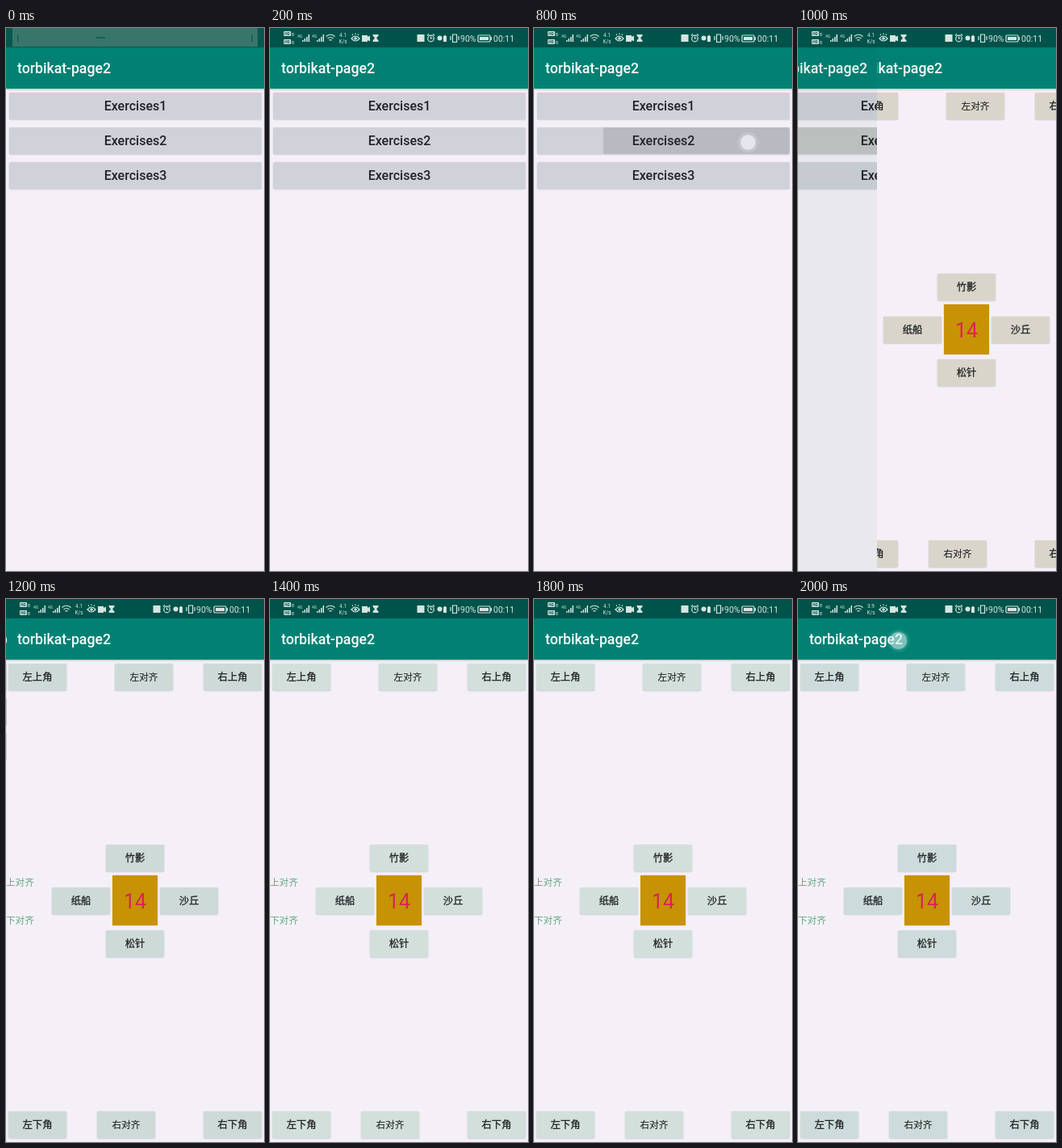
These frames come from a looping animation (320 by 672 pixels, 2.2 s). An HTML page:

```html
<!DOCTYPE html>
<html lang="zh">
<head>
<meta charset="utf-8">
<title>Layout demo</title>
<style>
html, body { margin: 0; width: 100%; height: 100%; overflow: hidden; background: #f5f0f7; }
.stage { position: relative; width: 320px; height: 672px; overflow: hidden; background: #f5f0f7;
  font-family: Roboto, "Noto Sans CJK SC", "Noto Sans CJK", sans-serif; }
.stage *, .stage svg { animation-duration: 2.2s; animation-timing-function: step-end; animation-iteration-count: infinite; }
.page, .dim { position: absolute; inset: 0; }
.page { background: #f5f0f7; }
.bar { position: absolute; top: 24px; left: 0; width: 306px; height: 51px; padding-left: 14px; background: #008174;
  color: #f4fbfa; font: 500 17.7px/52px Roboto, sans-serif; white-space: nowrap; box-shadow: 0 1px 2px #0004; }
.row, .btn { position: absolute; top: calc(var(--y) * 1px); height: 33px; border-radius: 2px; text-align: center;
  color: #202326; box-shadow: 0 0 1px #7f9a9a55, 0 1px 2px #5a708040; }
.row { left: 4px; width: 313px; background: #d1d1d9; font: 500 16px/34px Roboto, sans-serif; overflow: hidden; }
.row span { position: relative; }
.btn { left: calc(var(--x) * 1px); width: 72px; background: #cedad8; font-size: 12.3px; line-height: 35px;
  -webkit-text-stroke: .3px; animation-name: tint; }
.plain { font-size: 11.6px; -webkit-text-stroke-width: .15px; }
.note { position: absolute; left: 0; font-size: 11.6px; line-height: 16px; color: #5ea782; }
.box { position: absolute; left: 132px; top: 342px; width: 56px; height: 62px; background: #c79204; color: #d8245a;
  font: 25px/66px Roboto, sans-serif; text-align: center; box-shadow: 0 0 1px #c7920499; }
.list { animation-name: leave; }
.dim { background: #0a53460d; opacity: 0; animation-name: dim; }
.ripple { position: absolute; inset: 0; background: #b9bac1; opacity: 0; animation-name: ripple; }
.detail { animation-name: enter; visibility: hidden; }
.touch { position: absolute; width: 19px; height: 19px; margin: -10.5px; border-radius: 50%; opacity: 0;
  border: 1px solid #b4bac6; background: #e5e5ed; box-shadow: 0 0 3px 1px #e3e6ed88; }
.press { left: 265px; top: 141px; animation-name: press; }
.tap { left: 124px; top: 51px; background: #d5eeeb99; border-color: #9fd0c899; box-shadow: 0 0 4px 1px #b5ddd677;
  animation-name: late; }
.status { position: absolute; left: 0; top: 0; }
.status text { font-family: Roboto, sans-serif; }
.cover { animation-name: cover; opacity: 0; }
.first { animation-name: early; }
.last { animation-name: late; opacity: 0; }

@keyframes cover { 0% { opacity: 1 } 9.09%, 100% { opacity: 0 } }
@keyframes press { 0% { opacity: 0 } 27.27% { opacity: 1 } 45.45%, 100% { opacity: 0 } }
@keyframes ripple {
  0% { opacity: 0 }
  36.36% { opacity: 1; left: 82px }
  45.45%, 100% { opacity: 1; left: 0; background: #c5c5c5 }
}
@keyframes dim { 0% { opacity: 0 } 45.45%, 100% { opacity: 1 } }
@keyframes leave { 0% { transform: none } 45.45%, 100% { transform: translateX(-44px) } }
@keyframes enter {
  0% { visibility: hidden }
  45.45% { visibility: visible; transform: translateX(49px); clip-path: inset(0 0 0 49px) }
  54.54% { visibility: visible; transform: none; clip-path: inset(0 0 0 1px) }
  63.63%, 100% { visibility: visible; transform: none; clip-path: inset(0) }
}
@keyframes tint {
  0% { background: #d9d5ca }
  54.54% { background: #cedad8 }
  63.63% { background: #d3dfda }
  72.72% { background: #d6e1da }
  81.81% { background: #d3dfda }
  90.9%, 100% { background: #cddcda }
}
@keyframes early { 0% { opacity: 1 } 90.9%, 100% { opacity: 0 } }
@keyframes late { 0% { opacity: 0 } 90.9%, 100% { opacity: 1 } }
</style>
</head>
<body>
<div class="stage">
  <div class="page list">
    <div class="row" style="--y:80"><span>Exercises1</span></div>
    <div class="row" style="--y:123"><i class="ripple"></i><span>Exercises2</span></div>
    <div class="row" style="--y:166"><span>Exercises3</span></div>
    <div class="bar">torbikat-page2</div>
    <div class="dim"></div>
  </div>

  <div class="page detail">
    <div class="bar">torbikat-page2</div>
    <div class="btn" style="--x:3;--y:80">左上角</div>
    <div class="btn plain" style="--x:135;--y:80">左对齐</div>
    <div class="btn" style="--x:245;--y:80">右上角</div>
    <div class="btn" style="--x:124;--y:304">竹影</div>
    <div class="btn" style="--x:57;--y:357">纸船</div>
    <div class="btn" style="--x:191;--y:357">沙丘</div>
    <div class="btn" style="--x:124;--y:410">松针</div>
    <div class="box">14</div>
    <div class="note" style="top:343px">上对齐</div>
    <div class="note" style="top:390px">下对齐</div>
    <div class="btn" style="--x:3;--y:634">左下角</div>
    <div class="btn plain" style="--x:113;--y:634">右对齐</div>
    <div class="btn" style="--x:245;--y:634">右下角</div>
  </div>

  <i class="touch press"></i>
  <i class="touch tap"></i>

  <svg class="status" width="320" height="24" fill="#d5e5e2">
    <defs>
      <g id="hd">
        <rect width="9" height="6" rx="1"/>
        <text x="1" y="5" font-size="5" font-weight="700" fill="#00534a">HD</text>
        <text x="10" y="5.5" font-size="5">B</text>
      </g>
      <g id="signal">
        <text y="5" font-size="5">4G</text>
        <path d="M6 10V8h1.5v2zM8.5 10V6H10v4zM11 10V4h1.5v6zM13.5 10V1H15v9z"/>
      </g>
    </defs>
    <rect width="320" height="24" fill="#00534a"/>
    <use href="#hd" x="17" y="4"/>
    <use href="#hd" x="17" y="14"/>
    <use href="#signal" x="34" y="7"/>
    <use href="#signal" x="52" y="7"/>
    <g fill="none" stroke="#d5e5e2" stroke-width="1.2">
      <path d="M69.5 10.5q5.5-4.5 11 0M71.5 13q3.5-3 7 0M73.5 15.3q1.5-1.3 3 0"/>
      <path d="M101 13q5-6 10 0q-5 6-10 0zM103 9l-1-1.5M106 8V6.5M109 9l1-1.5"/>
      <circle cx="199.5" cy="13" r="3.8"/>
      <path d="M199.5 10.5V13h2M195 9.5l2-2M204 9.5l-2-2"/>
      <path d="M226.5 8h5v9.5h-5zM224 10v5M234 10v5"/>
      <rect x="258" y="9" width="15" height="8" rx="1"/>
    </g>
    <g font-size="6.5" text-anchor="middle">
      <text class="first" x="90.5" y="11">4.1</text>
      <text class="last" x="90.5" y="11">3.9</text>
      <text x="90.5" y="19">K/s</text>
    </g>
    <circle cx="106" cy="13" r="1.8"/>
    <path d="M114 9h7v2l3-1.5v7L121 15v2h-7z"/>
    <path d="M127.5 8h7v1.5l-2.5 3 2.5 3V17h-7v-1.5l2.5-3-2.5-3z"/>
    <rect x="182.5" y="8" width="9" height="9"/>
    <circle cx="210.5" cy="12.5" r="3"/>
    <path d="M215 10h1V9h2v1h1v7h-4z"/>
    <text x="236" y="16.5" font-size="10.5">90%</text>
    <path d="M260 11h11v4h-11zM273.5 11h1.5v4h-1.5z"/>
    <text x="277" y="16.5" font-size="10.5">00:11</text>
    <g class="cover">
      <rect width="320" height="24" fill="#07594e"/>
      <rect x="8" width="304" height="23" fill="#3a756b"/>
      <path d="M14 8h1.5v9H14zM304.5 8h1.5v9h-1.5zM112 11h11v2h-11z" fill="#145f55"/>
    </g>
  </svg>
</div>
</body>
</html>
```
